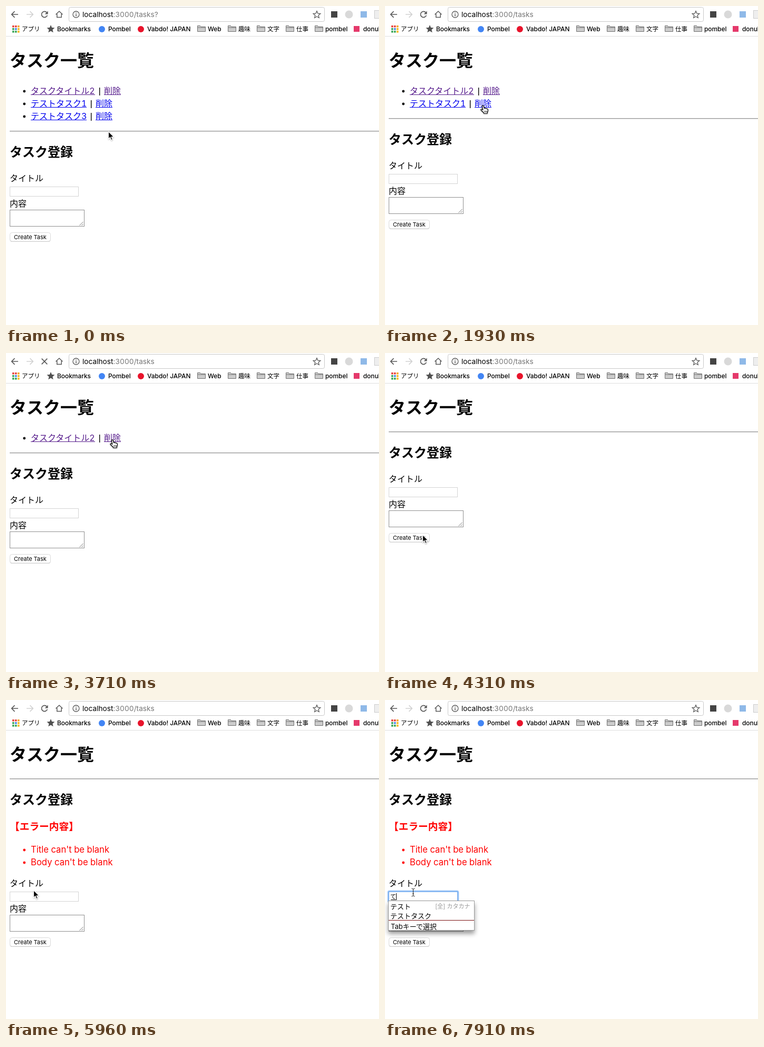
An HTML page for the animation above (8000 ms loop, 708 px wide and 606 px high).

```html
<!DOCTYPE html>
<html lang="ja">
<head>
<meta charset="utf-8">
<title>タスク一覧</title>
<style>
  html, body { margin: 0; width: 100%; height: 100%; overflow: hidden; background: #fff; }
  svg { display: block; width: 708px; height: 606px; }
  text { font-family: Inter, "Noto Sans CJK JP", "Noto Sans CJK", sans-serif; font-size: 16px; font-variant-numeric: tabular-nums; white-space: pre; }
  .heading { font-weight: bold; }
  .bar text { font-size: 11.9px; font-weight: 500; }
  .bar .url { font-size: 13.7px; font-weight: 400; }
  .bar .kanji { font-size: 11.5px; }
  .icon { fill: none; stroke: #5a5a5a; stroke-width: 1.7; }
  .visited { fill: #551a8b; }
  .link { fill: #0000ee; }
  .error { fill: #f00; }
  .error .item { font-size: 16.65px; }
  .popup text { font-size: 13px; }
  .popup .hint { font-size: 11px; fill: #999; }
</style>
</head>
<body>
<svg viewBox="0 0 708 606">
  <defs>
    <path id="folder" d="M.5 1.5h5l1.5 2h8.5v9H.5zM.5 5h15" fill="#ccc" stroke="#707070"/>
    <circle id="bullet" cx="34.8" r="2.4"/>
    <filter id="soft" x="-30%" y="-30%" width="160%" height="180%">
      <feDropShadow dx="0" dy="6" stdDeviation="4" flood-opacity=".4"/>
    </filter>
    <filter id="tiny" x="-50%" y="-50%" width="200%" height="200%">
      <feDropShadow dx="0" dy="1" stdDeviation=".9" flood-opacity=".4"/>
    </filter>
  </defs>
  <rect width="708" height="606" fill="#fff"/>

  <g class="bar">
    <path class="icon" d="M23 16H11M16.5 10.2 10.7 16l5.8 5.8"/>
    <path class="icon" style="stroke:#d2d2d2" d="M39 16h12M45.5 10.2 51.3 16l-5.8 5.8"/>
    <g id="reload">
      <path class="icon" d="M77.3 12.2A5.6 5.6 0 1 0 78.4 17.8"/>
      <path d="M79.6 9.6v5.9h-5.9z" fill="#5a5a5a"/>
    </g>
    <path id="stop" class="icon" d="M67.7 10.7l10.6 10.6M78.3 10.7 67.7 21.3"/>
    <path class="icon" style="stroke-width:1.5" d="M94.5 16.3 101 10l6.5 6.3M96.8 15v6.6h8.4V15"/>
    <rect x="119.5" y="2.5" width="485" height="27" rx="3" fill="#fff" stroke="#c8c8c8"/>
    <circle class="icon" style="stroke-width:1.3" cx="133" cy="16" r="6"/>
    <path d="M132.3 12.5h1.5v1.5h-1.5zm0 2.8h1.5v4.2h-1.5z" fill="#5a5a5a"/>
    <text class="url" x="145" y="21">localhost<tspan id="path" fill="#777">:3000/tasks</tspan></text>
    <path class="icon" style="stroke-width:1.3" d="M590 9.6l1.9 4.5 4.9.4-3.7 3.2 1.1 4.8-4.2-2.5-4.2 2.5 1.1-4.8-3.7-3.2 4.9-.4z"/>
    <rect x="617" y="10" width="12" height="12" fill="#444"/>
    <circle cx="651" cy="16" r="7.5" fill="#d9d9d9"/>
    <rect x="673" y="10" width="12" height="12" fill="#8fb9e8"/>
    <rect x="699.5" y="8.5" width="14" height="15" fill="#eee" stroke="#ccc"/>

    <g id="apps"></g>
    <text x="30" y="48" class="kanji">アプリ</text>
    <path d="M85 36l2.1 5 5.4.5-4.1 3.5 1.3 5.3-4.7-2.9-4.7 2.9 1.3-5.3-4.1-3.5 5.4-.5z" fill="#505050"/>
    <text x="97" y="48">Bookmarks</text>
    <circle cx="182" cy="44" r="6" fill="#4285f4"/>
    <text x="194" y="48">Pombel</text>
    <circle cx="256" cy="44" r="6" fill="#e8132b"/>
    <text x="268" y="48">Vabdo! JAPAN</text>
    <use href="#folder" x="363" y="36"/><text x="383" y="48">Web</text>
    <use href="#folder" x="421" y="36"/><text class="kanji" x="441" y="48">趣味</text>
    <use href="#folder" x="476" y="36"/><text class="kanji" x="496" y="48">文字</text>
    <use href="#folder" x="531" y="36"/><text class="kanji" x="551" y="48">仕事</text>
    <use href="#folder" x="586" y="36"/><text x="606" y="48">pombel</text>
    <rect x="660" y="38" width="11" height="11" fill="#e5396b"/>
    <text x="678" y="48">donubi</text>
    <rect y="57" width="708" height="1" fill="#dedede"/>
  </g>

  <text class="heading" x="7" y="114.5" style="font-size:32px">タスク一覧</text>
  <g id="tasks"></g>

  <g id="section">
    <rect x="7" y="237" width="701" height="1" fill="#9a9a9a"/>
    <rect x="7" y="238" width="701" height="1" fill="#d4d4d4"/>
    <text class="heading" x="7" y="286" style="font-size:24px">タスク登録</text>
  </g>

  <g id="errors" class="error">
    <text class="heading" x="7" y="247" style="font-size:18.72px">【エラー内容】</text>
    <use href="#bullet" y="285"/><text class="item" x="47" y="290">Title can't be blank</text>
    <use href="#bullet" y="309"/><text class="item" x="47" y="314">Body can't be blank</text>
  </g>

  <g id="form">
    <text x="7" y="333">タイトル</text>
    <rect x="7.5" y="343.5" width="130" height="18" fill="#fff" stroke="#d4d4d4"/>
    <text x="7" y="381">内容</text>
    <rect x="7.5" y="387.5" width="141" height="31" fill="#fff" stroke="#8f8f8f"/>
    <path d="M139.5 417l7-7M143.5 417l3-3" stroke="#777"/>
    <rect x="7.5" y="431" width="77" height="17" rx="4" fill="#ccc"/>
    <rect x="7.5" y="430.5" width="77" height="16.5" rx="4" fill="#fff" stroke="#dadada"/>
    <text x="15" y="443" style="font-size:11px">Create Task</text>
  </g>

  <g id="focus">
    <rect x="6" y="363" width="133" height="21" rx="2.5" fill="none" stroke="#a9cdf8" stroke-width="3"/>
    <rect x="7" y="364" width="131" height="19" rx="1" fill="#fff" stroke="#6aa6ee" stroke-width="1.6"/>
  </g>
  <g id="typed">
    <text x="10" y="378" style="font-size:11px">て</text>
    <rect x="11" y="379" width="10" height="1"/>
  </g>
  <rect id="caret" y="367" width="1" height="13"/>

  <g id="popup" class="popup">
    <rect id="panel" x="6.5" y="381.5" width="163" fill="#fff" stroke="#999" filter="url(#soft)"/>
    <text x="10" y="396.5">テスト</text>
    <text class="hint" x="95" y="395.5">[全] カタカナ</text>
    <text x="10" y="414.5">テストタスク</text>
    <text id="extra" x="10" y="432.5">テストタスク3</text>
    <g id="tabRow">
      <rect x="7" y="418" width="162" height="1" fill="#7a1010"/>
      <text x="11" y="434.5">Tabキーで選択</text>
    </g>
  </g>

  <g id="arrow" filter="url(#tiny)">
    <path d="M0 0V14l3.2-3 2.3 5.3 2.3-1-2.2-5.1H10z" stroke="#fff" stroke-width="1.1"/>
  </g>
  <g id="hand" filter="url(#tiny)">
    <path d="M3.4 2.4C3.2.7 5.6.3 6.2 2l1.3 4.6c.4-1 2-1 2.4.3.6-.8 2-.6 2.3.7.9-.6 2.1 0 2.2 1.4.2 2-.1 3.2-1 4.6L13.2 16H6.7L6 14.3 1.4 10C.4 8.7 1.9 7.3 3.2 8.3l1.7 1.3z"
      fill="#fff" stroke="#000" stroke-width="1.2" stroke-linejoin="round"/>
    <path d="M8 11v3M10 11v3M12 11v3" stroke="#000" stroke-width=".8"/>
  </g>
  <path id="beam" d="M-3-7.5q3 0 3 2v11q0 2-3 2M3-7.5q-3 0-3 2v11q0 2 3 2M-1.5 2.5h3" fill="none" stroke="#222"/>
</svg>
<script>
const LOOP = 8000;
const el = id => document.getElementById(id);
const show = (id, on) => el(id).setAttribute('visibility', on ? 'visible' : 'hidden');
const move = (id, x, y) => el(id).setAttribute('transform', `translate(${x} ${y})`);
const within = (t, from, to) => t >= from && t < to;
const latest = (steps, t) => steps.filter(step => step[0] <= t).pop();

const appColors = ['#e8453c', '#e8453c', '#f5a623', '#3aa757', '#4285f4', '#f5b914', '#3aa757', '#3aa757', '#f5b914'];
el('apps').innerHTML = appColors.map((color, i) =>
  `<rect x="${12 + i % 3 * 5}" y="${37 + Math.floor(i / 3) * 5}" width="3.6" height="3.6" fill="${color}"/>`).join('');

const link = (x, y, width, label) =>
  `<text x="${x}" y="${y}">${label}</text><rect x="${x}" y="${y + 1}" width="${width}" height="1"/>`;

// Each task: title, width of its link, link class
const tasks = [['タスクタイトル2', 122, 'visited'], ['テストタスク1', 106, 'link'], ['テストタスク3', 106, 'link']];
el('tasks').innerHTML = tasks.map(([title, width, kind], i) => {
  const y = 167 + i * 24;
  return `<g id="task${i}"><use href="#bullet" y="${y - 5}"/>
    <g class="${kind}">${link(47, y, width, title)}<g id="delete${i}">${link(64 + width, y, 32, '削除')}</g></g>
    <rect x="${55 + width}" y="${y - 12}" width="1.4" height="15"/></g>`;
}).join('');

// Time, shape, x, y
const pointer = [
  [0, 'arrow', 194.5, 238.5], [150, 'arrow', 191, 228], [300, 'hand', 185, 217], [440, 'hand', 183, 213],
  [1630, 'arrow', 187, 206], [1780, 'hand', 182, 193], [1930, 'hand', 181, 188],
  [2970, 'arrow', 189, 180], [3120, 'hand', 192, 170], [3270, 'hand', 196, 166], [3410, 'hand', 197, 164],
  [4160, 'arrow', 150, 235], [4310, 'arrow', 71.5, 345.5], [4460, 'arrow', 60, 351], [4610, 'arrow', 54, 353],
  [4760, 'arrow', 51.5, 354], [5960, 'arrow', 52.5, 361.5], [6110, 'beam', 53.5, 365.5]
];
// Time, tasks left, shift of the section, shift of the form
const pages = [[0, 3, 0, 0], [1030, 2, -24, -24], [2670, 1, -48, -48], [3860, 0, -88, -88], [5210, 0, -88, 21]];
const loading = [[740, 1180], [2220, 2670], [3710, 4010], [5060, 5210]];

function draw(t) {
  const [, count, sectionY, formY] = latest(pages, t);
  tasks.forEach((_, i) => show('task' + i, i < count));
  move('section', 0, sectionY);
  move('form', 0, formY);
  show('errors', t >= 5210);

  const busy = loading.some(([from, to]) => within(t, from, to));
  show('stop', busy);
  show('reload', !busy);
  el('path').textContent = t < 890 ? ':3000/tasks?' : ':3000/tasks';
  el('delete0').setAttribute('fill', within(t, 3560, 3710) ? '#f00' : '#551a8b');

  const typed = t >= 7310, threeRows = t < 7910;
  show('focus', t >= 6410);
  show('caret', within(t, 6410, 6860) || typed);
  el('caret').setAttribute('x', typed ? 21 : 10);
  show('typed', typed);
  show('popup', typed);
  show('extra', typed && threeRows);
  el('panel').setAttribute('height', threeRows ? 74 : 56);
  move('tabRow', 0, threeRows ? 18 : 0);

  const [, shape, x, y] = latest(pointer, t);
  for (const name of ['arrow', 'hand', 'beam']) show(name, name === shape);
  move(shape, x, y);
}

const start = performance.now();
function tick() {
  draw((performance.now() - start) % LOOP);
  requestAnimationFrame(tick);
}
tick();
</script>
</body>
</html>
```
